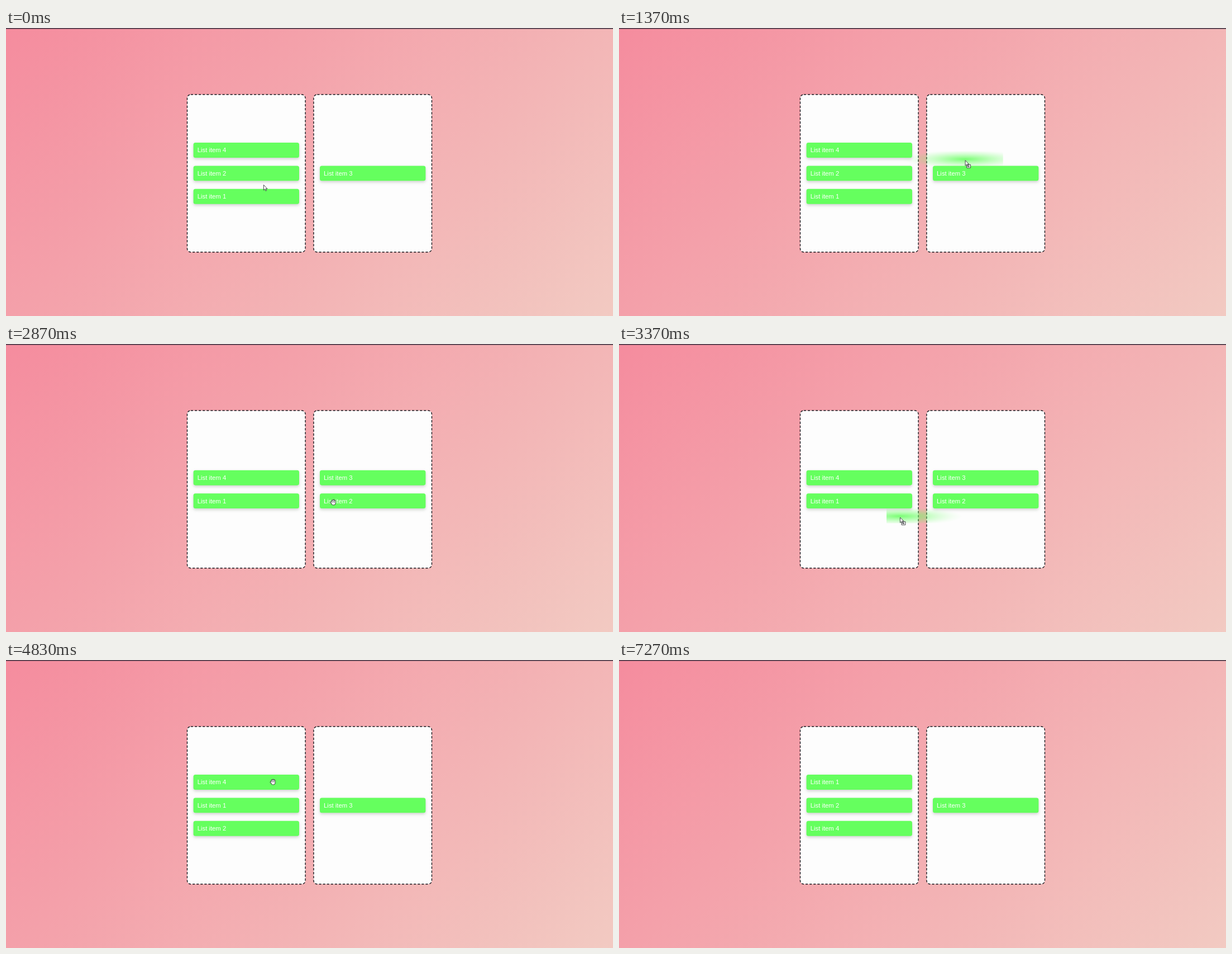
Recreate the animation shown at these times as an HTML page with a canvas. Size 1087x515 px, loop 7.3 s.

```html
<!DOCTYPE html>
<html lang="en">
<head>
<meta charset="utf-8">
<title>Drag and drop lists</title>
<style>
html, body { margin: 0; width: 100%; height: 100%; overflow: hidden; background: #f5a6ae; }
canvas { display: block; }
</style>
</head>
<body>
<canvas width="1087" height="515"></canvas>
<script>
const canvas = document.querySelector('canvas');
const ctx = canvas.getContext('2d');
const { width: W, height: H } = canvas;
const LOOP = 7300;
const SCALE = 0.708; // the page is shown zoomed out
const GREEN = '101,255,94', INK = '#1c1c22';

const column = { w: 213, h: 400 * SCALE, gap: 13.4, midY: 259.9 };
const item = { w: 189.4, h: 38 * SCALE, pitch: 41.4, radius: 5 * SCALE };

const point = (t, x, y) => ({ t, x, y });
const ENTER = point(0, 461, 280);
const EXIT = point(6950, 540, 535);
const MOVES = [
  { id: 2, to: 1, grab: point(780, 457, 262), drop: point(1600, 658, 230) },
  { id: 2, to: 0, grab: point(2950, 586, 283), drop: point(3600, 470, 320) },
  { id: 4, to: 0, grab: point(4930, 478, 218), drop: point(5500, 476, 318) }
];
const REST = 400, SETTLE = 120; // pauses after a drop and before a grab

function glide(a, b, t) {
  const u = Math.min(1, Math.max(0, (t - a.t) / (b.t - a.t)));
  const e = u * u * (3 - 2 * u);
  return { x: a.x + (b.x - a.x) * e, y: a.y + (b.y - a.y) * e };
}

function pointerAt(t) {
  let from = ENTER;
  for (const { grab, drop } of MOVES) {
    if (t < grab.t) return approach(from, grab, t);
    if (t < drop.t) return glide(grab, drop, t);
    from = drop;
  }
  return approach(from, EXIT, t);
}

function approach(a, b, t) {
  return glide({ ...a, t: a.t + REST }, { ...b, t: b.t - SETTLE }, t);
}

const columnX = c => W / 2 + (c ? column.gap / 2 : -column.gap / 2 - column.w);

// A dropped item leaves its list and joins the end of the chosen one
function layout(t) {
  let lists = [[4, 2, 1], [3]];
  for (const { id, to, drop } of MOVES) {
    if (t < drop.t) break;
    lists = lists.map(list => list.filter(n => n !== id));
    lists[to].push(id);
  }
  return lists.flatMap((list, c) => list.map((id, i) => ({
    id,
    x: columnX(c) + (column.w - item.w) / 2,
    y: column.midY + (i - (list.length - 1) / 2) * item.pitch - item.h / 2
  })));
}

function roundBox(x, y, w, h, r) {
  ctx.beginPath();
  ctx.roundRect(x, y, w, h, r);
}

function drawBackground() {
  const d = (W + H) / 4; // 135 degree gradient, corner to corner
  const g = ctx.createLinearGradient(W / 2 - d, H / 2 - d, W / 2 + d, H / 2 + d);
  g.addColorStop(0, '#f58c9e');
  g.addColorStop(1, '#f2cac2');
  ctx.fillStyle = g;
  ctx.fillRect(0, 0, W, H);
  ctx.fillStyle = '#3d3140';
  ctx.fillRect(0, 0, W, 1.6);
}

function drawColumn(c) {
  const line = 2 * SCALE, dash = 3 * line, r = 10 * SCALE - line / 2;
  const w = column.w - line, h = column.h - line;
  const length = 2 * (w + h) - (8 - 2 * Math.PI) * r;
  const period = length / Math.round(length / (5 * line));
  roundBox(columnX(c) + line / 2, column.midY - h / 2, w, h, r);
  ctx.fillStyle = '#fdfdfd';
  ctx.fill();
  ctx.setLineDash([dash, period - dash]);
  ctx.lineWidth = line;
  ctx.strokeStyle = INK;
  ctx.stroke();
  ctx.setLineDash([]);
}

function drawItem({ id, x, y }) {
  ctx.save();
  ctx.shadowColor = 'rgba(0,0,0,.17)';
  ctx.shadowBlur = 5;
  ctx.shadowOffsetY = 2.5;
  roundBox(x, y, item.w, item.h, item.radius);
  ctx.fillStyle = `rgb(${GREEN})`;
  ctx.fill();
  ctx.restore();
  ctx.fillStyle = '#fff';
  ctx.font = `${16 * SCALE}px "Liberation Sans", Arial, sans-serif`;
  ctx.fillText('List item ' + id, x + 10 * SCALE, y + 17.4);
}

// Translucent copy that fades away from the pointer
function drawGhost(x, y, p) {
  const reach = 112;
  ctx.save();
  ctx.beginPath();
  ctx.rect(x, y, item.w, item.h);
  ctx.clip();
  ctx.translate(p.x, p.y - 1.5);
  ctx.scale(1, .15);
  const g = ctx.createRadialGradient(0, 0, 0, 0, 0, reach);
  for (let u = 0; u <= 1; u += .125) {
    g.addColorStop(u, `rgba(${GREEN},${.87 * (1 - u) ** 1.4})`);
  }
  ctx.fillStyle = g;
  ctx.fillRect(-reach, -reach, 2 * reach, 2 * reach);
  ctx.restore();
}

function outline(path, width = .8) {
  ctx.fillStyle = '#fff';
  ctx.strokeStyle = INK;
  ctx.lineWidth = width;
  ctx.fill(path);
  ctx.stroke(path);
}

const ARROW = new Path2D('M.4 .6V10L2.6 8L4 11.3L5.5 10.6L4.1 7.4H7Z');
const BADGE = new Path2D('M3 8.2H9.8V14H3Z');
const PLUS = new Path2D('M4.7 11.1H8.1M6.4 9.4V12.8');

// Four fingers in an arc, a thumb and a palm
function drawHand() {
  const hand = new Path2D();
  for (let i = 0; i < 4; i++) {
    const x = (i - 1.5) * 1.8;
    hand.moveTo(x + .4, 2);
    hand.lineTo(x + .4, -3.9 + x * x * .2);
  }
  hand.moveTo(-1, 3);
  hand.lineTo(-4, .4);
  hand.roundRect(-1.6, 1, 4, 3, 1);
  ctx.lineCap = 'round';
  for (const [color, width] of [[INK, 2.7], ['#fff', 1.2]]) {
    ctx.strokeStyle = color;
    ctx.lineWidth = width;
    ctx.stroke(hand);
  }
  ctx.fillStyle = '#fff';
  ctx.fill(hand);
}

function drawPointer(p, kind) {
  ctx.save();
  ctx.translate(p.x, p.y);
  ctx.lineJoin = 'round';
  if (kind === 'hand') {
    drawHand();
  } else {
    if (kind === 'drag') {
      outline(BADGE);
      ctx.stroke(PLUS);
    }
    outline(ARROW);
  }
  ctx.restore();
}

function render(t) {
  const p = pointerAt(t), items = layout(t);
  const move = MOVES.find(m => t >= m.grab.t && t < m.drop.t);
  const over = items.some(({ x, y }) =>
    p.x >= x && p.x <= x + item.w && p.y >= y && p.y <= y + item.h);
  drawBackground();
  [0, 1].forEach(drawColumn);
  items.forEach(drawItem);
  if (move) {
    const home = items.find(i => i.id === move.id);
    drawGhost(home.x + p.x - move.grab.x, home.y + p.y - move.grab.y, p);
  }
  drawPointer(p, move ? 'drag' : over ? 'hand' : 'arrow');
}

const start = performance.now();
function tick() {
  render((performance.now() - start) % LOOP);
  requestAnimationFrame(tick);
}
tick();
</script>
</body>
</html>
```
